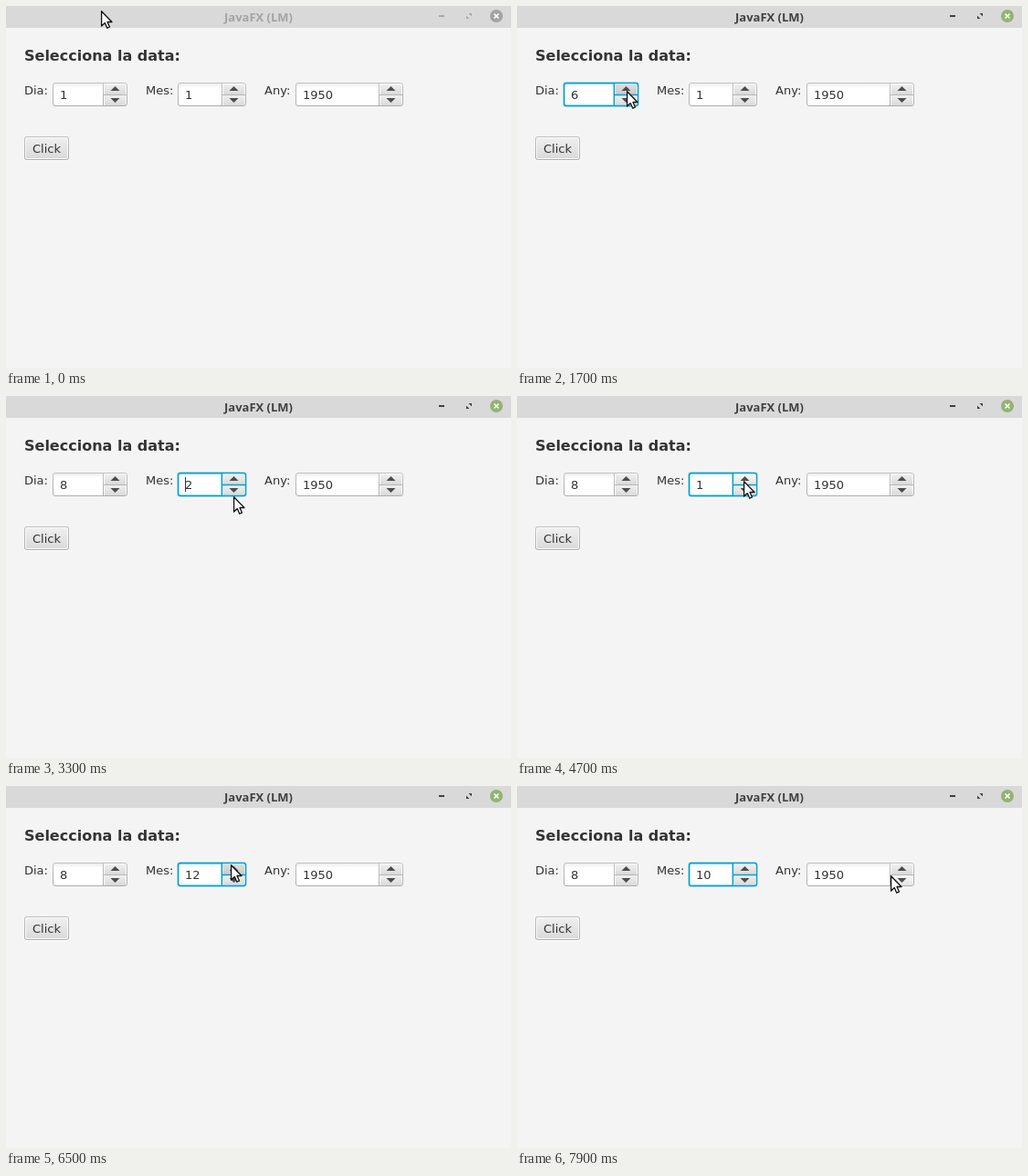
These frames come from a looping animation (553 by 397 pixels, 8000 ms). An HTML page:

```html
<!DOCTYPE html>
<html lang="ca">
<head>
<meta charset="utf-8">
<title>JavaFX (LM)</title>
<style>
  html, body { margin: 0; width: 100%; height: 100%; overflow: hidden; background: #f4f4f4; }
  svg { display: block; width: 553px; height: 397px; }
  text { font: 13px "DejaVu Sans", sans-serif; fill: #333; white-space: pre; }
  .heading { font-size: 16px; font-weight: bold; }
  .title { font: 600 13px "Noto Sans", sans-serif; text-anchor: middle; }
</style>
</head>
<body>
<svg id="stage" viewBox="0 0 553 397">
  <defs>
    <linearGradient id="normal" x2="0" y2="1"><stop stop-color="#efefef"/><stop offset="1" stop-color="#dadada"/></linearGradient>
    <linearGradient id="hover" x2="0" y2="1"><stop stop-color="#f8f8f8"/><stop offset="1" stop-color="#e4e4e4"/></linearGradient>
    <linearGradient id="armed" x2="0" y2="1"><stop stop-color="#dedede"/><stop offset="1" stop-color="#cacaca"/></linearGradient>
    <linearGradient id="edge" x2="0" y2="1"><stop stop-color="#c2c2c2"/><stop offset="1" stop-color="#acacac"/></linearGradient>
    <linearGradient id="field" x2="0" y2="1"><stop stop-color="#ececec"/><stop offset=".2" stop-color="#fff"/></linearGradient>
  </defs>
</svg>
<script>
const LOOP = 8000, FRAME = 100;
const stage = document.getElementById('stage');

function add(tag, attrs, parent = stage) {
  const node = document.createElementNS('http://www.w3.org/2000/svg', tag);
  set(node, attrs);
  parent.appendChild(node);
  return node;
}
function set(node, attrs) {
  for (const key in attrs) node.setAttribute(key, attrs[key]);
}
function label(x, y, content, cls = '') {
  const node = add('text', { x, y, class: cls });
  node.textContent = content;
  return node;
}

// Window and title bar
add('rect', { width: 553, height: 397, fill: '#f4f4f4' });
add('rect', { width: 553, height: 24, fill: '#d9d9d9' });
const title = label(276.5, 17, 'JavaFX (LM)', 'title');
const titleIcons = add('path', { d: 'M474 10h6v2h-6zM506.5 8h3.5v3.5zM504 10.5v3.5h3.5z' });
const closeDisc = add('circle', { cx: 537, cy: 11, r: 7 });
add('path', { d: 'M534.5 8.5l5 5m0-5l-5 5', stroke: '#fff', 'stroke-width': 1.6 });

// Form
label(20, 60, 'Selecciona la data:', 'heading');
label(20, 97, 'Dia:');
label(153, 97, 'Mes:');
label(283, 97, 'Any:');
add('rect', { x: 20, y: 144, width: 49, height: 26, rx: 3, fill: '#fff' });
add('rect', { x: 20, y: 143, width: 49, height: 26, rx: 3, fill: 'url(#edge)' });
add('rect', { x: 21, y: 144, width: 47, height: 24, rx: 2, fill: '#fafafa' });
add('rect', { x: 22, y: 145, width: 45, height: 22, rx: 1.5, fill: 'url(#normal)' });
label(29, 161, 'Click');

function makeSpinner(x, width) {
  const split = x + width - 27, mid = split + 13.5;
  const glow = add('rect', { x: x - 1, y: 83, width: width + 2, height: 28, rx: 4, fill: '#039ed3' });
  add('rect', { x, y: 84, width, height: 26, rx: 3, fill: '#f4f4f4' });
  add('rect', { x: x + 1, y: 85, width: width - 27, height: 24, fill: 'url(#field)' });
  const inner = add('rect', { x: x + 1.5, y: 85.5, width: width - 29, height: 23, fill: 'none',
    stroke: '#039ed3', 'stroke-opacity': .25 });
  const arrows = [85, 97].map(y => {
    add('rect', { x: split + 1, y, width: 25, height: 12, fill: '#fafafa' });
    return add('rect', { x: split + 2, y: y + 1, width: 23, height: 11 });
  });
  const border = add('path', { fill: 'none',
    d: `M${x + 3} 84.5H${x + width - 3}q2.5 0 2.5 2.5V107q0 2.5-2.5 2.5H${x + 3}q-2.5 0-2.5-2.5V87q0-2.5 2.5-2.5z` +
       `M${split + .5} 84.5v25M${split + .5} 97.5h26` });
  add('path', { fill: '#4d4d4d',
    d: `M${mid - 5} 93h10l-5-5zM${mid - 5} 101h10l-5 5z` });
  const text = label(x + 8, 102, '');
  const caret = add('path', { d: `M${x + 8.5} 89v16`, stroke: '#333' });

  return (value, focused, caretOn, tip, pressed) => {
    if (text.textContent !== String(value)) text.textContent = value;
    set(glow, { opacity: focused ? .16 : 0 });
    set(inner, { opacity: focused ? 1 : 0 });
    set(border, { stroke: focused ? '#039ed3' : 'url(#edge)', 'stroke-width': focused ? 1.4 : 1 });
    set(caret, { opacity: focused && caretOn ? 1 : 0 });
    const inside = tip.x >= split && tip.x < x + width;
    arrows.forEach((arrow, i) => {
      const top = 85 + i * 12;
      const over = inside && tip.y >= top && tip.y < top + 12;
      set(arrow, { fill: `url(#${over ? (pressed ? 'armed' : 'hover') : 'normal'})` });
    });
  };
}
const drawDay = makeSpinner(51, 82);
const drawMonth = makeSpinner(188, 75);
const drawYear = makeSpinner(317, 118);

const pointer = add('path', { d: 'M.6 .8V17L4.3 13.6 6.8 19.2 9.5 18 7 12.5H12z',
  fill: '#fff', stroke: '#111', 'stroke-width': 1.3, 'stroke-linejoin': 'round' });

// Pointer path: time, x, y
const route = [
  [0, 104, 5], [300, 123, 97], [500, 123, 97], [700, 120, 93], [2100, 120, 93],
  [2300, 200, 124], [2400, 253, 112], [2500, 246, 89], [3000, 246, 89],
  [3300, 249, 110], [3400, 249, 110], [3800, 248, 77], [4000, 248, 77],
  [4300, 253, 99], [4400, 253, 99], [4700, 248, 93], [4800, 247, 83],
  [5300, 247, 83], [5500, 246, 86], [6500, 246, 86], [6800, 250, 102],
  [7200, 250, 102], [7900, 409, 98]
];
const monthUps = [2900, 4800, 5000, 5300, 5400, 5600, 5700, 5900, 6000, 6100, 6300, 6500];
const monthDowns = [4400, 6900, 7100];

function pointerAt(t) {
  const next = route.findIndex(key => key[0] > t);
  if (next < 0) return { x: 409, y: 98 };
  const [t0, x0, y0] = route[next - 1], [t1, x1, y1] = route[next];
  const k = (t - t0) / (t1 - t0);
  return { x: Math.round(x0 + (x1 - x0) * k), y: Math.round(y0 + (y1 - y0) * k) };
}
const countUntil = (times, t) => times.filter(time => time <= t).length;

function render(time) {
  const t = Math.floor((time % LOOP) / FRAME) * FRAME;
  const active = t >= 900;
  const tip = pointerAt(t);
  const caretOn = t >= 1000 && Math.floor(t / 500) % 2 === 0;
  const day = 1 + Math.max(0, Math.min(7, Math.floor((t - 700) / 200)));
  const month = 1 + countUntil(monthUps, t) - countUntil(monthDowns, t);
  const dayPressed = active && t < 2200 && t % 400 !== 200;
  const monthPressed = monthUps.includes(t) || monthDowns.includes(t);

  set(title, { style: `fill:${active ? '#404040' : '#a3a3a3'}` });
  set(titleIcons, { fill: active ? '#404040' : '#a8a8a8' });
  set(closeDisc, { fill: active ? '#92b372' : '#a3a3a3' });
  drawDay(day, active && t < 2900, caretOn, tip, dayPressed);
  drawMonth(month, t >= 2900, caretOn, tip, monthPressed);
  drawYear(1950, false, false, tip, false);
  set(pointer, { transform: `translate(${tip.x} ${tip.y})` });
}

function tick() {
  render(performance.now());
  requestAnimationFrame(tick);
}
tick();
</script>
</body>
</html>
```
